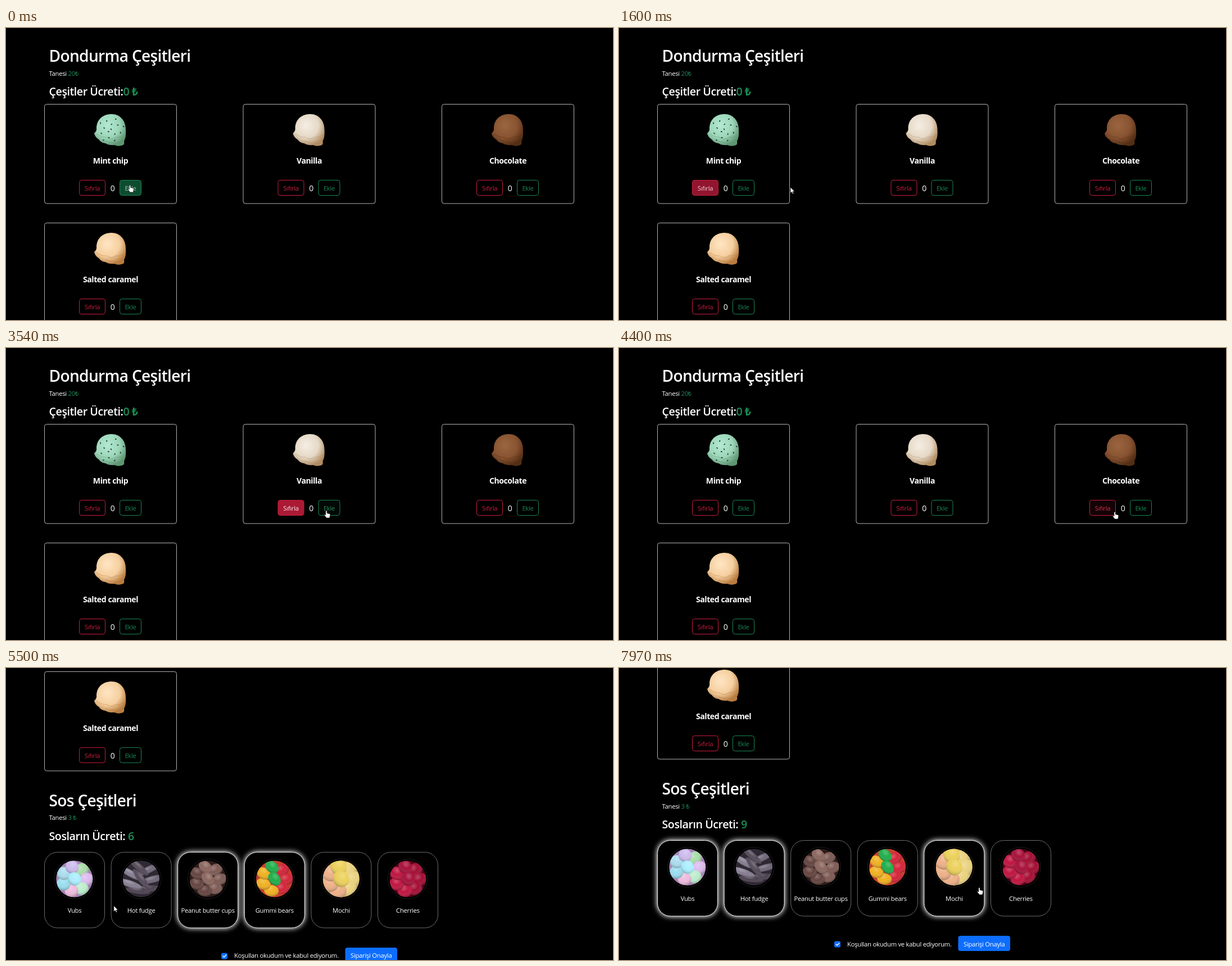
Recreate the animation shown at these times as an HTML page. Size 1080 px wide and 519 px high, loop 8 s.

```html
<!DOCTYPE html>
<html lang="tr">
<head>
<meta charset="utf-8">
<style>
  html, body { margin: 0; width: 100%; height: 100%; overflow: hidden; background: #000; }
  svg { display: block; width: 100vw; height: 100vh; }
  text { font: 11.25px 'Open Sans', 'Noto Sans', sans-serif; letter-spacing: -.024em; fill: #fff; }
  .h1 { font-size: 28.1px; font-weight: 600; }
  .h3 { font-size: 19.7px; font-weight: 600; }
  .title { font-size: 14.06px; font-weight: 700; letter-spacing: -.03em; }
  .count { font-size: 14.06px; }
  .mid { text-anchor: middle; }
  .price { fill: #198f57; }
  .card { fill: #000; stroke: #b4b4b4; }
  .glow { fill: #fff; filter: blur(5px); }
</style>
</head>
<body>
<svg id="stage" viewBox="0 0 1080 519"></svg>
<script>
const LOOP = 8000, FADE = 150, RED = '#c81e3f', GREEN = '#198754';
const LEFT = 68.5, COLUMN = 353.5, SAUCE_STEP = 118.6;

// name, light, middle and dark tone
const flavours = [
  ['Mint chip', '#b3ead3', '#9bd5b8', '#5f9673'],
  ['Vanilla', '#f5eee4', '#e5d8c6', '#b08c62'],
  ['Chocolate', '#9a653f', '#885331', '#542e14'],
  ['Salted caramel', '#ffe5c4', '#f5cf9f', '#b87c40'],
];

// name, gap colour, piece width and height, colours clockwise from the upper right
const sauces = [
  ['Vubs', '#a583b4', 12, 11.5, '#ada #dbe #bec #ebd #9de #ade #cbe #aef'],
  ['Hot fudge', '#2f2934', 22, 6, '#6f6678 #4c4250 #857d90 #544a59'],
  ['Peanut butter cups', '#2e1d1c', 13, 10, '#7d5a53 #65443f #8b665e'],
  ['Gummi bears', '#c8402e', 13, 10, '#d42438 #f0b020 #1fae4a'],
  ['Mochi', '#c9a45a', 15, 14, '#ead27e #eeb088 #ecd05a'],
  ['Cherries', '#4d0419', 13, 11.5, '#a30d33 #c01440 #a8103a'],
];

const text = (x, y, cls, body, id = '') => `<text x="${x}" y="${y}" class="${cls}" id="${id}">${body}</text>`;
const price = (body, id = '') => `<tspan class="price" id="${id}">${body}</tspan>`;
const box = (x, y, w, h, r, attrs) => `<rect x="${x}" y="${y}" width="${w}" height="${h}" rx="${r}" ${attrs}/>`;
const repeat = (n, fn) => Array.from({ length: n }, (_, k) => fn(k)).join('');

const chip = k => `<ellipse rx="1.6" ry=".9" fill="#1d3028"
  transform="translate(30 27) rotate(${k * 137.5}) translate(${6.3 * Math.sqrt(k)}) rotate(50)"/>`;

const scoop = ([, light, mid, dark], i) => `
  <radialGradient id="scoop${i}" cx=".42" cy=".35" r=".66">
    <stop stop-color="${light}"/><stop offset=".6" stop-color="${mid}"/><stop offset="1" stop-color="${dark}"/>
  </radialGradient>
  <g transform="translate(88.5 17.5)">
    <path fill="url(#scoop${i})" d="M0 34Q5 30 4 24C5 8 17 0 31 0C46 0 56 12 56 27Q57 42 53 48Q55 55 48 56Q42 58 36 55Q27 56 20 52Q12 51 8 45Q1 41 0 34Z"/>
    <path fill="none" stroke="${dark}" stroke-opacity=".5" d="M5 35Q14 42 22 41Q30 47 39 41Q48 42 54 36M20 48Q32 53 46 50"/>
    ${i ? '' : repeat(15, chip)}
  </g>`;

const button = (id, x, w, label, colour) =>
  box(x, 135, w, 27, 4, `id="fill${id}" fill="${colour}" fill-opacity="0" stroke="${colour}"`) +
  text(x + w / 2, 153.5, 'mid', label, 'label' + id);

const flavourCard = (flavour, i) => `<g transform="translate(${LEFT + i % 3 * COLUMN} ${i < 3 ? 135.5 : 346.5})">
  ${box(0, 0, 235, 176.5, 4, 'class="card"')}${scoop(flavour, i)}
  ${text(117.5, 105.5, 'mid title', flavour[0])}
  ${button(i * 2, 62, 46, 'Sıfırla', RED)}
  ${text(121, 154.5, 'mid count', 0, 'count' + i)}
  ${button(i * 2 + 1, 134, 38, 'Ekle', GREEN)}</g>`;

// Seven pieces in a ring and one on top in the middle
function pile([, gap, rx, ry, palette]) {
  const colours = palette.split(' ');
  const ellipse = fill => `<ellipse rx="${rx}" ry="${ry}" fill="${fill}"/>`;
  return `<circle r="33" fill="${gap}"/>` + repeat(8, k => {
    const angle = k * 360 / 7 - 50, out = k < 7 ? 21.5 : 0;
    return `<g transform="rotate(${angle}) translate(${out}) rotate(${-angle - 25 + k * 11})">
      ${ellipse(colours[Math.floor(k * colours.length / 8)])}${ellipse('url(#shade)')}</g>`;
  });
}

const sauceCard = (sauce, i) => `<g transform="translate(${LEFT + i * SAUCE_STEP} 667.5)">
  ${box(-1, -1, 109, 136.5, 24, `class="glow" id="glow${i}"`)}
  ${box(0, 0, 107, 134.5, 23, `class="card" id="sauce${i}"`)}
  <g transform="translate(53.3 47.5)"><circle r="35.5" fill="none" stroke="#1d1d1d"/>
    <g clip-path="url(#round)">${pile(sauce)}</g></g>
  ${text(53.5, 107.5, 'mid', sauce[0])}</g>`;

document.getElementById('stage').innerHTML = `
  <clipPath id="round"><circle r="32.5"/></clipPath>
  <radialGradient id="shade" cx=".4" cy=".3" r=".75">
    <stop stop-color="#fff" stop-opacity=".25"/><stop offset=".45" stop-color="#fff" stop-opacity="0"/>
    <stop offset="1" stop-opacity=".3"/>
  </radialGradient>
  <g id="page">
    ${text(76.5, 60, 'h1', 'Dondurma Çeşitleri')}
    ${text(76.5, 84.5, '', 'Tanesi ' + price('20₺'))}
    ${text(76.5, 120, 'h3', 'Çeşitler Ücreti:' + price('0 ₺', 'scoopTotal'))}
    ${flavours.map(flavourCard).join('')}
    ${text(76.5, 586, 'h1', 'Sos Çeşitleri')}
    ${text(76.5, 610.5, '', 'Tanesi ' + price('3 ₺'))}
    ${text(76.5, 646, 'h3', 'Sosların Ücreti: ' + price('6', 'sauceTotal'))}
    ${sauces.map(sauceCard).join('')}
    ${box(383, 846.5, 11, 11, 2.8, 'fill="#0d6efd"')}
    <path d="M386 852l2 2 3.7-3.8" fill="none" stroke="#fff" stroke-width="1.4" stroke-linecap="round"/>
    ${text(406, 855.5, '', 'Koşulları okudum ve kabul ediyorum.')}
    ${box(603.5, 837, 92.5, 27, 4, 'fill="#0d6efd"')}
    ${text(649.7, 855.5, 'mid', 'Siparişi Onayla')}
  </g>
  <g id="cursor" fill="#fff" stroke="#000" stroke-width=".7" stroke-linejoin="round">
    <path id="arrow" d="M0 0V10.5L2.5 8.3 4 12 5.8 11.2 4.2 7.7H7.5Z"/>
    <path id="hand" d="M-1.2 1Q0-1 1.3 1V4.6L5.6 5.6Q7 6 6.9 7.6L5.8 13H.2L-3.6 8Q-3.8 6.4-2.2 6.9L-1.2 8Z"/>
  </g>`;

const el = {};
document.querySelectorAll('[id]').forEach(node => el[node.id] = node);

// The pointer rests at each stop from one time to another and glides in between
const point = (x, y, from, to = from) => ({ x, y, from, to });
const add = (i, from, to) => ({ ...point(LEFT + i * COLUMN + 152, 279, from, to), kind: 'add', i });
const reset = (i, from, to) => ({ ...point(LEFT + i * COLUMN + 90, 285, from, to), kind: 'reset', i });
const pick = (i, from, to) => ({ ...point(118.5 + i * SAUCE_STEP, 375, from, to), kind: 'pick', i });
const stops = [
  point(240, 340, -200), add(0, -30, 700), reset(0, 900, 1555), point(305, 283, 1600),
  add(1, 1950, 2650), reset(1, 2850, 3510), point(570, 289, 3540, 3650),
  point(860, 330, 4330), point(882, 291, 4400, 4430), point(245, 457, 4950, 5300),
  pick(0, 5750, 6100), pick(1, 6330, 6680), pick(2, 6830, 7030), pick(3, 7180, 7380), pick(4, 7600, 7760),
  point(641, 390, 7970),
];

const clamp = v => Math.max(0, Math.min(1, v));
const ease = (t, a, b) => { const k = clamp((t - a) / (b - a)); return k * k * (3 - 2 * k); };
const scrollAt = t => 279 * ease(t, 4580, 4980) + 82 * ease(t, 5300, 5600);

function pointerAt(t) {
  const i = stops.findIndex(s => s.from > t);
  if (i < 1) return stops[i ? stops.length - 1 : 0];
  const a = stops[i - 1], b = stops[i], k = ease(t, a.to, b.from);
  return { x: a.x + (b.x - a.x) * k, y: a.y + (b.y - a.y) * k };
}

// Index of the button under the pointer, or -1
function buttonAt(t) {
  const { x, y } = pointerAt(t), dx = (x - LEFT) % COLUMN, card = Math.floor((x - LEFT) / COLUMN);
  if (scrollAt(t) || y < 270 || y > 298) return -1;
  return dx > 62 && dx < 108 ? card * 2 : dx > 134 && dx < 172 ? card * 2 + 1 : -1;
}

// Hover fills follow from where the pointer has just been
function hoverFills(t) {
  const fills = Array(8).fill(0), step = 5;
  for (let s = t - 3 * FADE; s < t; s += step) {
    const over = buttonAt(s);
    fills.forEach((f, b) => fills[b] = clamp(f + (b === over ? step : -step) / FADE));
  }
  return fills;
}

function orderAt(t) {
  const counts = flavours.map(() => 0), chosen = sauces.map((_, i) => i === 2 || i === 3);
  for (const { kind, i, from, to } of stops) {
    const done = t >= (from + to) / 2;
    if (kind === 'add' && t > from) counts[i] = Math.floor((Math.min(t, to) - from) / 300);
    if (kind === 'reset' && done) counts[i] = 0;
    if (kind === 'pick' && done) chosen[i] = !chosen[i];
  }
  return { counts, chosen };
}

function draw(t) {
  const scroll = scrollAt(t), { x, y } = pointerAt(t), { counts, chosen } = orderAt(t);
  el.page.setAttribute('transform', `translate(0 ${-scroll})`);

  hoverFills(t).forEach((f, b) => {
    el['fill' + b].setAttribute('fill-opacity', f * .95);
    el['label' + b].style.fill = `color-mix(in srgb, #fff ${f * 100}%, ${b % 2 ? GREEN : RED})`;
  });
  counts.forEach((n, i) => el['count' + i].textContent = n);
  chosen.forEach((on, i) => {
    el['glow' + i].style.opacity = on ? 1 : 0;
    el['sauce' + i].style.stroke = on ? '#eee' : '#6c6c6c';
  });
  el.scoopTotal.textContent = 20 * counts.reduce((a, b) => a + b) + ' ₺';
  el.sauceTotal.textContent = 3 * chosen.filter(Boolean).length;

  const overSauce = scroll > 360 && (x - LEFT) % SAUCE_STEP < 107;
  const hand = overSauce || buttonAt(t) >= 0;
  el.cursor.setAttribute('transform', `translate(${x} ${y})`);
  el.hand.style.display = hand ? '' : 'none';
  el.arrow.style.display = hand ? 'none' : '';
}

const start = performance.now();
function tick() {
  draw((performance.now() - start) % LOOP);
  requestAnimationFrame(tick);
}
tick();
</script>
</body>
</html>
```
